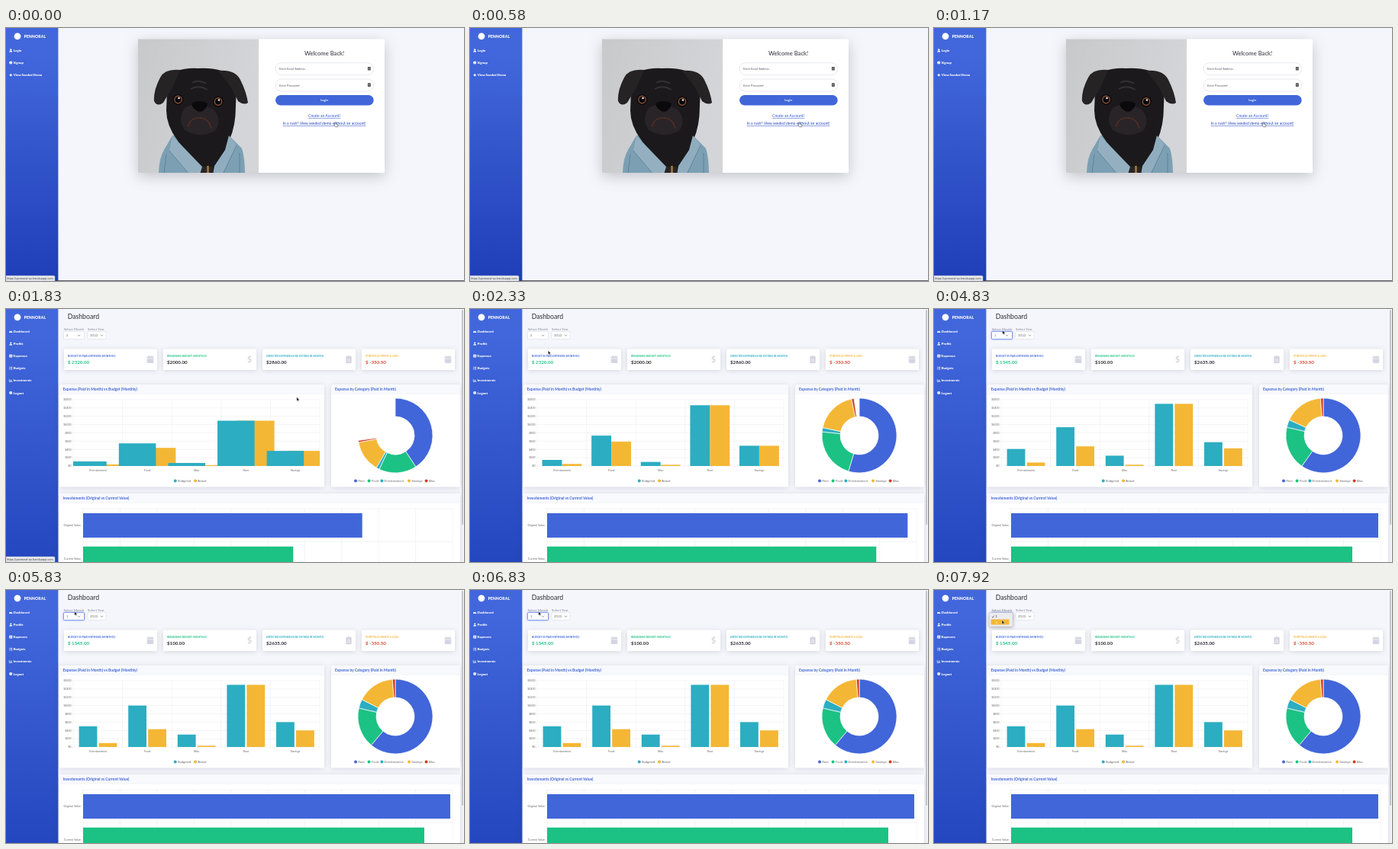
Recreate the animation shown at these times as an HTML page. Size 600 px wide and 332 px high, loop 8 s.

```html
<!DOCTYPE html>
<html lang="en">
<head>
<meta charset="utf-8">
<title>Budget dashboard</title>
<style>
  html, body { margin: 0; width: 100%; height: 100%; overflow: hidden; background: #f5f6fb; }
  svg { display: block; width: 100vw; height: 100vh; font-family: Lato, sans-serif; }
  .b { font-weight: 700; }
  .heavy { font-weight: 900; }
  .mid { text-anchor: middle; }
  .end { text-anchor: end; }
  .chart { font-family: "Liberation Sans", Arial, sans-serif; fill: #666; }
  .card { fill: #fff; filter: drop-shadow(0 1px 3px rgba(58, 59, 69, .17)); }
  .modal { fill: #fff; filter: drop-shadow(0 5px 9px rgba(58, 59, 69, .26)); }
  .menu { fill: #ececef; stroke: #b9bac2; stroke-width: .4; filter: drop-shadow(0 1px 2px rgba(0, 0, 0, .3)); }
  .field { fill: #fff; stroke: #d1d3e2; stroke-width: .5; }
  .focus { stroke: #6f8ae2; stroke-width: .8; filter: drop-shadow(0 0 .8px #7d96ea); }
  .grid { stroke: #e4e4e7; stroke-width: .4; fill: none; }
  .line { fill: none; stroke: #555; stroke-width: .6; }
</style>
</head>
<body>
<svg id="stage" viewBox="0 0 600 332" preserveAspectRatio="none">
  <defs>
    <linearGradient id="sideLogin" x2="0" y2="1">
      <stop offset=".1" stop-color="#4267dc"/><stop offset="1" stop-color="#1f3eb7"/>
    </linearGradient>
    <linearGradient id="sideDash" x2="0" y2="1">
      <stop offset=".1" stop-color="#4267dc"/><stop offset="1" stop-color="#2446be"/>
    </linearGradient>
    <linearGradient id="wall" x2="1" y2=".3">
      <stop stop-color="#c8c9cb"/><stop offset="1" stop-color="#d4d5d8"/>
    </linearGradient>
    <clipPath id="photoClip"><rect x="173" y="14.5" width="158" height="175.5"/></clipPath>
    <clipPath id="plotClip"><rect x="88" y="115" width="323" height="91"/></clipPath>
  </defs>
  <g id="login"></g>
  <g id="dash"></g>
  <g id="brand"></g>
  <g id="status"></g>
  <path id="hand" transform="translate(430 123.5)" fill="#fff" stroke="#222" stroke-width=".5"
    d="M1 0Q1.9 0 1.9 1V2.4L4.3 3Q5 3.3 4.8 4.2L4.2 6.3H1.6L-.3 3.9Q0 3.1 .6 3.6V1Q.6 0 1 0Z"/>
  <path id="arrow" fill="#111" stroke="#fff" stroke-width=".45"
    d="M0 0V5.3L1.2 4.2 2 6 2.9 5.6 2.1 3.9H3.8Z"/>
</svg>
<script>
const BLUE = '#4166d9', GREEN = '#1bc283', TEAL = '#2cadc1', YELLOW = '#f4b735', RED = '#d0402b', INK = '#2b2c34';
const $ = id => document.getElementById(id);

const text = (x, y, s, size, fill = INK, cls = '', extra = '') =>
  `<text x="${x}" y="${y}" font-size="${size}" fill="${fill}" class="${cls}" ${extra}>${s}</text>`;
const label = (x, y, s, size = 3.65, cls = '') =>
  `<text x="${x}" y="${y}" font-size="${size}" class="chart ${cls}">${s}</text>`;
const rect = (x, y, w, h, attrs = '') => `<rect x="${x}" y="${y}" width="${w}" height="${h}" ${attrs}/>`;
const dot = (x, y, r, fill) => `<circle cx="${x}" cy="${y}" r="${r}" fill="${fill}"/>`;
const path = (d, attrs = '') => `<path d="${d}" ${attrs}/>`;
const range = n => [...Array(n).keys()];

// Sidebar icons, drawn around the origin
const icons = {
  user: dot(0, -1, 1.1, '#fff') + path('M-2 2Q-2 .2 0 .2T2 2Z'),
  info: dot(0, 0, 2, '#fff') + rect(-.3, -.3, .6, 1.4, `fill="${BLUE}"`) + dot(0, -1, .35, BLUE),
  star: path('M0-2.1.6-.7 2.1-.6 1 .4 1.3 1.9 0 1.1-1.3 1.9-1 .4-2.1-.6-.6-.7Z'),
  gauge: path('M-2.2 1.5A2.2 2.2 0 1 1 2.2 1.5Z') + path('M0 .8 1-.9', `stroke="${BLUE}" stroke-width=".5"`),
  table: rect(-2, -1.8, 4, 3.6, 'rx=".4"') + path('M-1.6 0H1.6M0-.9V1.5', `stroke="${BLUE}" stroke-width=".4"`),
  list: path('M-2-1.4H-1.2M-.6-1.4H2M-2 0H-1.2M-.6 0H2M-2 1.4H-1.2M-.6 1.4H2', 'stroke="#fff" stroke-width=".7"'),
  chart: path('M-2-1.7V1.6H2M-1 1V-.2M.1 1V-1.2M1.2 1V-.6', 'stroke="#fff" stroke-width=".6" fill="none"'),
};
const sidebar = (gradient, items) => rect(0, 0, 68.4, 332, `fill="url(#${gradient})"`) +
  items.map(([icon, name], i) => {
    const y = 29.4 + i * 16.1;
    return `<g transform="translate(6.3 ${y})" fill="#fff">${icons[icon]}</g>` +
      text(9.8, y + 1.6, name, 4.25, '#fff', 'heavy');
  }).join('');

$('brand').innerHTML = dot(15, 10.8, 4.4, '#fff') +
  text(23.8, 12.6, 'PENNORAL', 4.9, '#fff', 'heavy', 'letter-spacing=".2"');
$('status').innerHTML = path('M0 325H62.5Q64 325 64 326.5V332H0Z', 'fill="#e3e5ea" stroke="#c3c6d0" stroke-width=".4"') +
  `<text x="1.2" y="329.8" font-size="3.6" fill="#444" font-family="Inter, sans-serif">https://pennoral-qv.herokuapp.com</text>`;

const dogEye = (x, y) => dot(x, y, 7, '#0d0c0d') + dot(x, y, 5.4, '#8a5236') +
  dot(x, y, 4, '#0b0a0b') + dot(x + 1, y - 2, 1.3, '#e8e8ea');
const photo = `<g clip-path="url(#photoClip)">
  ${rect(173, 14, 158, 177, 'fill="url(#wall)"')}
  ${path('M200 192Q200 172 207 160L218 141 292 141 309 158Q313 170 313 192Z', 'fill="#7c9fb4"')}
  ${path('M222 57Q236 52 252 53 268 52 282 56 296 62 302 76L301 102Q301 128 293 146 288 170 270 192H258Q232 170 225 148 210 128 210 108L211 82Q214 64 222 57Z', 'fill="#1b191b"')}
  ${path('M228 55Q208 53 202 65 193 82 194 96 198 104 206 98L218 78ZM278 56Q300 54 307 68 315 84 317 98 312 102 304 96L295 78Z', 'fill="#262325"')}
  ${path('M244 72Q252 67 262 73M242 80Q252 74 264 81', 'fill="none" stroke="#343033" stroke-width="2"')}
  ${path('M234 105Q252 95 272 107 284 122 274 135 254 146 234 134 224 120 234 105Z', 'fill="#292427"')}
  ${path('M238 130Q242 117 253 118 265 117 269 132', 'fill="none" stroke="#4a2b25" stroke-width="2"')}
  ${path('M243 99Q254 93 264 99 263 108 254 110 245 108 243 99Z', 'fill="#0b0a0b"')}
  ${dogEye(225.5, 94)}${dogEye(278, 96.5)}
  ${path('M218 141 232 156 258 183 254 192H240L214 161Z', 'fill="#94b0c0"')}
  ${path('M292 141 302 154 284 192H271L273 181 287 160Z', 'fill="#90adbe"')}
  ${path('M214 161 240 192M302 154 284 192M210 166 207 190M306 164V190', 'fill="none" stroke="#567d94" stroke-width=".8"')}
  ${path('M257 182H270L272 192H254Z', 'fill="#2b2524"')}
  ${path('M264.5 181V192', 'stroke="#c99a4c" stroke-width="2.5" stroke-dasharray="1.4 .6"')}
</g>`;

const input = (y, name) => rect(353, y, 128.7, 16, 'rx="8" class="field"') +
  text(358, y + 9.6, name, 3.9, '#5c5e6b') +
  rect(473.8, y + 5.3, 4, 4.6, 'rx=".6" fill="#555"') +
  path(`M474.5 ${y + 7.6}H477.2`, 'stroke="#fff" stroke-width=".6" stroke-dasharray=".6 .4"');

$('login').innerHTML = rect(0, 0, 600, 332, 'fill="#f5f6fb"') +
  sidebar('sideLogin', [['user', 'Login'], ['info', 'Signup'], ['star', 'View Seeded Demo']]) +
  rect(173, 14.5, 323, 175.5, 'rx="1.5" class="modal"') + photo +
  text(417, 36.4, 'Welcome Back!', 7.7, INK, 'mid') +
  input(45.7, 'Enter Email Address') + input(67, 'Enter Password') +
  rect(353, 88, 128.7, 13.6, `rx="6.8" fill="${BLUE}"`) +
  text(417, 96.2, 'Login', 4, '#fff', 'b mid') +
  text(417, 117, 'Create an Account!', 5.02, '#3358d0', 'mid', 'text-decoration="underline"') +
  text(417, 127, 'In a rush? View seeded demo without an account!', 5.02, '#2449be', 'mid', 'text-decoration="underline"') +
  rect(0, 331.2, 600, .8, 'fill="#3c3e45"');

// Dashboard
const calendar = x => rect(x - 4.3, 62.3, 8.6, 8.7, 'rx="1" fill="#d3d6e2"') +
  path(`M${x - 2} 61V63M${x + 2} 61V63`, 'stroke="#d3d6e2" stroke-width="1.2"') +
  path(`M${x - 4.3} 65H${x + 4.3}`, 'stroke="#fff" stroke-width=".6"');
const clipboard = x => rect(x - 3.7, 62, 7.4, 9.2, 'rx="1" fill="#d3d6e2"') + dot(x, 62.2, 1.3, '#d3d6e2') +
  path(`M${x - 2} 66H${x + 2}M${x - 2} 68.3H${x + 2}`, 'stroke="#fff" stroke-width=".6"');
const dollar = x => text(x, 70, '$', 10.5, '#d3d6e2', 'b mid');

const stat = (i, name, color, icon, valueColor) => {
  const x = 76 + i * 130;
  return rect(x, 52.5, 122, 27.5, 'rx="1.5" class="card"') +
    text(x + 5, 63, name, 3.3, color, 'b') +
    text(x + 5, 71.6, '', 6.2, valueColor, 'b', `id="stat${i}"`) + icon(x + 113);
};
const panel = (x, y, w, h, title) => rect(x, y, w, h, 'rx="1.5" class="card"') +
  rect(x, y, w, 12.3, 'rx="1.5" fill="#f8f9fc"') + path(`M${x} ${y + 12.3}h${w}`, 'class="grid"') +
  text(x + 5, y + 8, title, 4.9, BLUE, 'b');
const chevron = x => path(`M${x - 1.6} 33.8 ${x} 35.4 ${x + 1.6} 33.8`, 'class="line"');
const legend = items => items.map(([x, name, color]) => dot(x, 225.6, 2, color) + label(x + 3.2, 227.2, name, 4.05)).join('');

const categories = ['Entertainment', 'Food', 'Misc', 'Rent', 'Savings'];
const CELL = 64.6, BASE = 206, PX_PER_DOLLAR = 87 / 1600;

const barAxes = range(9).map(i => {
  const y = BASE - i * 87 / 8;
  return path(`M86 ${y}H411`, 'class="grid"') + label(85.5, y + 1.3, '$' + i * 200, 3.65, 'end');
}).join('') + range(6).map(i => path(`M${88 + i * CELL} 119V208`, 'class="grid"')).join('') +
  categories.map((c, i) => label(120.5 + i * CELL, 212.6, c, 3.65, 'mid')).join('');

const investAxes = range(11).map(i => path(`M${101 + i * 48.4} 262V332`, 'class="grid"')).join('') +
  path('M99 262H585M99 305.5H585', 'class="grid"') +
  label(98, 285, 'Original Value', 3.65, 'end') + label(98, 328.8, 'Current Value', 3.65, 'end');

$('dash').innerHTML = rect(0, 0, 600, 332, 'fill="#f5f6fb"') +
  sidebar('sideDash', [['gauge', 'Dashboard'], ['user', 'Profile'], ['table', 'Expenses'],
    ['list', 'Budgets'], ['chart', 'Investments'], ['info', 'Logout']]) +
  text(80.7, 12.7, 'Dashboard', 8.7) +
  text(75.5, 28, 'Select Month', 4.55, '#858796') + text(107, 28, 'Select Year', 4.55, '#858796') +
  rect(75.5, 29.6, 27, 10, 'rx="1.2" class="field" id="month"') + text(78.7, 36.3, '2', 4.5, '#6e707e', '', 'id="monthText"') + chevron(95.7) +
  rect(107, 29.6, 24.3, 10, 'rx="1.2" class="field"') + text(110, 36.3, '2022', 4.5, '#6e707e') + chevron(125.5) +
  stat(0, 'BUDGET VS PAID EXPENSES (MONTHLY)', BLUE, calendar, GREEN) +
  stat(1, 'REMAINING BUDGET (MONTHLY)', GREEN, dollar, INK) +
  stat(2, 'EXPECTED EXPENSES (DUE OR PAID IN MONTH)', TEAL, clipboard, INK) +
  stat(3, 'PORTFOLIO PROFIT &amp; LOSS', YELLOW, calendar, '#de4630') +
  panel(69.5, 99, 347.5, 134.5, 'Expense (Paid in Month) vs Budget (Monthly)') +
  panel(426, 99, 169, 134.5, 'Expense by Category (Paid in Month)') +
  panel(69.5, 242, 525.5, 100, 'Investements (Original vs Current Value)') +
  barAxes + '<g id="bars" clip-path="url(#plotClip)"></g>' +
  legend([[221.7, 'Budgeted', TEAL], [248, 'Actual', YELLOW]]) +
  '<g id="donut" stroke="#fff" stroke-width=".7"></g>' +
  legend([[458, 'Rent', BLUE], [475.6, 'Food', GREEN], [492.4, 'Entertainment', TEAL], [528, 'Savings', YELLOW], [550.6, 'Misc', RED]]) +
  investAxes + rect(101, 268, 0, 32, `fill="${BLUE}" id="originalBar"`) + rect(101, 311.7, 0, 32, `fill="${GREEN}" id="currentBar"`) +
  rect(597, 1, 2, 282, 'rx="1" fill="#c3c4c9"') +
  `<g id="menu">${rect(72.3, 0, 31, 18.4, 'rx="1.6" class="menu"')}
    <rect id="hover" x="74.5" width="24" height="7" rx=".8" fill="${YELLOW}"/>
    ${text(80.5, 6.8, '1', 4.3, INK, '', 'id="option0"')}${text(80.5, 14, '2', 4.3, INK, '', 'id="option1"')}
    <path id="check" class="line" d="M76 0 77 1.2 78.7-1.6"/></g>`;

// Values follow the order of `categories`
const february = { budget: [150, 750, 100, 1500, 500], actual: [50, 600, 30, 1500, 500],
  stats: ['$ 2320.00', '$2000.00', '$2860.00', '$ -350.50'] };
const january = { budget: [500, 1000, 300, 1500, 600], actual: [95, 430, 30, 1500, 400],
  stats: ['$ 1545.00', '$100.00', '$2635.00', '$ -350.50'] };
const slices = [[3, BLUE], [1, GREEN], [0, TEAL], [4, YELLOW], [2, RED]];

const OPEN_DASH = 1410, OPEN_MENU = 3420, PICK = 4250, LOADED = 4400, REOPEN_MENU = 7580;
const mouse = [[1410, 431, 124], [1833, 380.8, 115.5], [2333, 102.3, 54.5], [3000, 91, 37], [3600, 90.5, 36],
  [4100, 89.7, 28], [7330, 89.7, 28], [7580, 90, 35], [7910, 89, 39.5]];

const clamp = v => Math.min(1, Math.max(0, v));
const mix = (a, b, p) => a + (b - a) * p;
const outQuart = (t, start, duration = 1500) => 1 - (1 - clamp((t - start) / duration)) ** 4;

function mouseAt(t) {
  const next = mouse.findIndex(k => k[0] > t);
  if (next < 0) return mouse.at(-1).slice(1);
  const [t0, x0, y0] = mouse[Math.max(0, next - 1)], [t1, x1, y1] = mouse[next];
  const p = clamp((t - t0) / (t1 - t0 || 1)), s = p * p * (3 - 2 * p);
  return [mix(x0, x1, s), mix(y0, y1, s)];
}

function slice(from, to, color) {
  const at = (r, a) => `${510 + r * Math.sin(a)} ${166 - r * Math.cos(a)}`;
  const large = to - from > Math.PI ? 1 : 0;
  return path(`M${at(49, from)}A49 49 0 ${large} 1 ${at(49, to)}L${at(25, to)}A25 25 0 ${large} 0 ${at(25, from)}Z`, `fill="${color}"`);
}

function drawCharts(t) {
  const grow = outQuart(t, 1416), change = outQuart(t, LOADED);
  const blend = key => february[key].map((v, i) => mix(v, january[key][i], change));
  const budget = blend('budget'), actual = blend('actual');

  const width = mix(115, 23.8, grow);
  const series = (values, offset, color) => values.map((v, i) => {
    const h = v * PX_PER_DOLLAR * grow;
    return rect(120.5 + i * CELL + offset - width / 2, BASE - h, width, h, `fill="${color}"`);
  }).join('');
  $('bars').innerHTML = series(actual, 13, YELLOW) + series(budget, -13, TEAL);

  const total = actual.reduce((a, b) => a + b);
  let angle = 0;
  $('donut').innerHTML = slices.map(([i, color]) => {
    const from = angle;
    angle += actual[i] / total * grow * 2 * Math.PI;
    return slice(from, angle, color);
  }).join('');

  $('originalBar').setAttribute('width', 481 * outQuart(t, 1383));
  $('currentBar').setAttribute('width', 447 * outQuart(t, 1533, 1412));
}

function drawMenu(t, mouseY) {
  const picked = t >= PICK, open = t >= OPEN_MENU && !picked || t >= REOPEN_MENU;
  show('menu', open);
  $('month').classList.toggle('focus', t >= OPEN_MENU);
  $('monthText').textContent = picked ? '1' : '2';
  const top = picked ? 29.6 : 22.6, hovered = mouseY - top < 8.5 ? 0 : 1, selected = picked ? 0 : 1;
  $('menu').setAttribute('transform', `translate(0 ${top})`);
  $('hover').setAttribute('y', 1.8 + hovered * 7.2);
  $('check').setAttribute('transform', `translate(0 ${5.5 + selected * 7.2})`);
  $('check').style.stroke = hovered === selected ? '#fff' : '#333';
  range(2).forEach(i => $('option' + i).setAttribute('fill', i === hovered ? '#fff' : INK));
}

function show(id, visible) {
  $(id).style.display = visible ? '' : 'none';
}

function frame(now) {
  const step = 1000 / 12;
  const t = Math.floor((now % 8000 + 4) / step) * step;
  const onDash = t >= OPEN_DASH;
  show('login', !onDash);
  show('hand', !onDash);
  show('dash', onDash);
  show('arrow', onDash);
  show('status', t < 2000);
  if (onDash) {
    const [x, y] = mouseAt(t);
    $('arrow').setAttribute('transform', `translate(${x} ${y})`);
    (t < LOADED ? february : january).stats.forEach((s, i) => $('stat' + i).textContent = s);
    drawCharts(t);
    drawMenu(t, y);
  }
  requestAnimationFrame(frame);
}
frame(performance.now());
</script>
</body>
</html>
```
